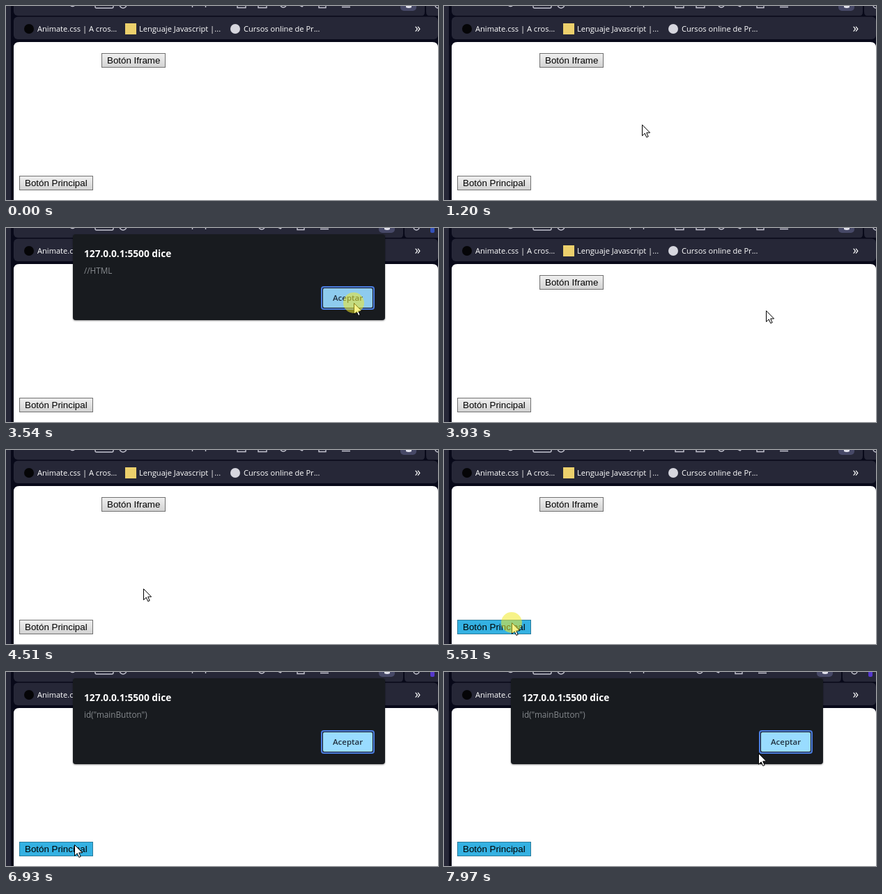
Write an HTML page that moves like this. It is 620 px wide and 280 px high and loops after 7.99 s.

```html
<!DOCTYPE html>
<html lang="es">
<head>
<meta charset="utf-8">
<style>
  html, body { margin: 0; width: 100%; height: 100%; overflow: hidden; background: #080919; }
  svg { display: block; font-family: "Open Sans", "Noto Sans", sans-serif; }
  .panel { fill: #262737; }
  .bookmarks { font-size: 11.1px; font-weight: 500; fill: #fff; }
  .button text { font: 13.333px "Liberation Sans", Arial, sans-serif; fill: #000; }
  .button rect { fill: url(#face); stroke: #707070; }
  .button.hover rect { fill: #34b1e2; stroke: #2a7c9c; }
  .icons { fill: none; stroke: #c6c6d2; stroke-width: 1.4; }
</style>
</head>
<body>
<svg width="620" height="280" viewBox="0 0 620 280">
  <defs>
    <linearGradient id="face" x2="0" y2="1">
      <stop stop-color="#f0f0f0"/><stop offset="1" stop-color="#d2d2d2"/>
    </linearGradient>
    <filter id="shadow" x="-5%" y="-10%" width="110%" height="125%" color-interpolation-filters="sRGB">
      <feDropShadow dx="0" dy="1" stdDeviation="1" flood-opacity=".4"/>
    </filter>
  </defs>

  <rect class="panel" width="7" height="280"/>
  <rect class="panel" x="11" y="-20" width="640" height="34" rx="6"/>
  <path class="icons" d="M92-1q3.500 3 7 0M128-6V1q0 2 2 2H152q2 0 2-2V-6M267.500-2V2M286.500-2V2"/>
  <circle class="icons" cx="168" cy="-2" r="5"/>
  <path class="icons" id="extras" d="M332-3V2.500h12V-3M362-3V2.500h12V-3"/>
  <g id="tools">
    <path d="M601-1V8q0 6-4 6h10q-4 0-4-6V-1Z" fill="#080919"/>
    <path class="icons" d="M394 0q4 4 8 0M421-1l4 2 2-2M449-3V2.500h10V-3M482 1.500h12"/>
    <rect x="566" y="-14" width="23" height="21" rx="5" fill="#474967"/>
    <path d="M574-2h8v4q-4 2-8 0Z" fill="#e4e4ee"/>
    <circle class="icons" cx="620" cy="-1" r="4"/>
    <rect id="badge" x="640" y="-9" width="6" height="16" rx="2"/>
  </g>

  <rect class="panel" x="11" y="15.500" width="609" height="32.500" rx="6"/>
  <g class="bookmarks">
    <circle cx="33" cy="33" r="7" fill="#050507"/>
    <rect x="171" y="25" width="16" height="16" fill="#ecd06c"/>
    <circle cx="329" cy="33" r="7" fill="#d6d6de"/>
    <text x="45" y="37">Animate.css | A cros...</text>
    <text x="191" y="37">Lenguaje Javascript |...</text>
    <text x="341" y="37">Cursos online de Pr...</text>
    <text x="586.500" y="38" font-size="17.500" font-weight="400">»</text>
  </g>

  <path d="M11 280V60q0-8 8-8H612q8 0 8 8V280Z" fill="#fff"/>
  <g class="button">
    <rect x="137.500" y="68.500" width="91" height="20"/>
    <text x="145" y="83">Botón Iframe</text>
  </g>
  <g class="button" id="main">
    <rect x="19.500" y="245.500" width="105" height="20"/>
    <text x="27" y="260">Botón Principal</text>
  </g>

  <g id="dialog">
    <rect x="96" y="9" width="448" height="124" rx="4" fill="#181b1f" filter="url(#shadow)"/>
    <text x="112" y="42" font-size="13.700" font-weight="650" fill="#fff">127.0.0.1:5500 dice</text>
    <text id="message" x="112" y="66" font-size="11.700" fill="#868a8e"></text>
    <rect x="453" y="85" width="75" height="32" rx="3" fill="none" stroke="#4a7de0" stroke-width="2"/>
    <rect id="accept" x="455" y="87" width="71" height="28" rx="2"/>
    <text x="469" y="105" font-size="11.500" font-weight="550" fill="#20303e">Aceptar</text>
  </g>

  <g id="cursor">
    <path d="M.5.500V16.300L4.200 12.800 6.800 18.500 9.200 17.400 6.700 11.900H11.600Z" fill="#fff" stroke="#000"/>
    <circle id="click" r="15" fill="#f0ea28" opacity=".55"/>
  </g>
</svg>
<script>
const LOOP = 7990;
const $ = id => document.getElementById(id);
const ramp = (t, from, to) => Math.min(1, Math.max(0, (t - from) / (to - from)));
const within = (t, from, to) => t >= from && t < to;

const linear = p => p;
const smooth = p => p * p * (3 - 2 * p);
const easeIn = p => p ** 1.4;
const easeOut = p => 1 - (1 - p) ** 2;

// Pointer stops: time, x, y, easing on the way there
const stops = [
  [580, 563, 280, linear],
  [1200, 284, 171, easeOut],
  [2520, 284, 171, linear],
  [3200, 499, 108, smooth],
  [3800, 499, 108, linear],
  [4330, 236, 187, easeIn],
  [4510, 197, 200, linear],
  [5140, 101, 247, linear],
  [5260, 97, 249, easeOut],
  [6910, 97, 249, linear],
  [7700, 440, 117, smooth],
  [7790, 440, 117, linear],
  [7970, 451, 117, smooth]
];

function pointer(t) {
  const next = stops.findIndex(s => s[0] > t);
  if (next < 1) return (next ? stops.at(-1) : stops[0]).slice(1, 3);
  const [t0, x0, y0] = stops[next - 1], [t1, x1, y1, ease] = stops[next];
  const p = ease(ramp(t, t0, t1));
  return [x0 + (x1 - x0) * p, y0 + (y1 - y0) * p];
}

function draw(t) {
  const [x, y] = pointer(t);
  $('cursor').setAttribute('transform', `translate(${Math.round(x)} ${Math.round(y)})`);
  $('cursor').style.display = t < 600 ? 'none' : '';
  const clicking = within(t, 1510, 1720) || within(t, 3540, 3720) || within(t, 5490, 5700);
  $('click').style.display = clicking ? '' : 'none';

  const second = t > 5000;
  const missing = 1 - (second ? ramp(t, 5840, 6090) : ramp(t, 1750, 2000));
  const closing = second ? 0 : ramp(t, 3730, 3900);
  $('dialog').setAttribute('opacity', (1 - missing ** 3) * (1 - closing));
  $('dialog').setAttribute('transform', `translate(0 ${-20 * missing ** 1.5 - 12 * closing})`);
  $('message').textContent = second ? 'id("mainButton")' : '//HTML';

  const overAccept = within(x, 455, 526) && within(y, 87, 115);
  $('accept').setAttribute('fill', overAccept ? '#8ecbee' : '#99dcff');
  $('main').classList.toggle('hover', t > 5500 || (t > 4500 && y >= 245));

  const shift = smooth(second ? ramp(t, 5720, 5860) : ramp(t, 1720, 1850) - ramp(t, 3740, 3900));
  $('tools').setAttribute('transform', `translate(${-31 * shift} 0)`);
  $('extras').setAttribute('opacity', 1 - shift);
  $('badge').setAttribute('fill', second ? '#5638cc' : '#3350b8');
}

const start = performance.now();
function tick() {
  draw((performance.now() - start) % LOOP);
  requestAnimationFrame(tick);
}
tick();
</script>
</body>
</html>
```
